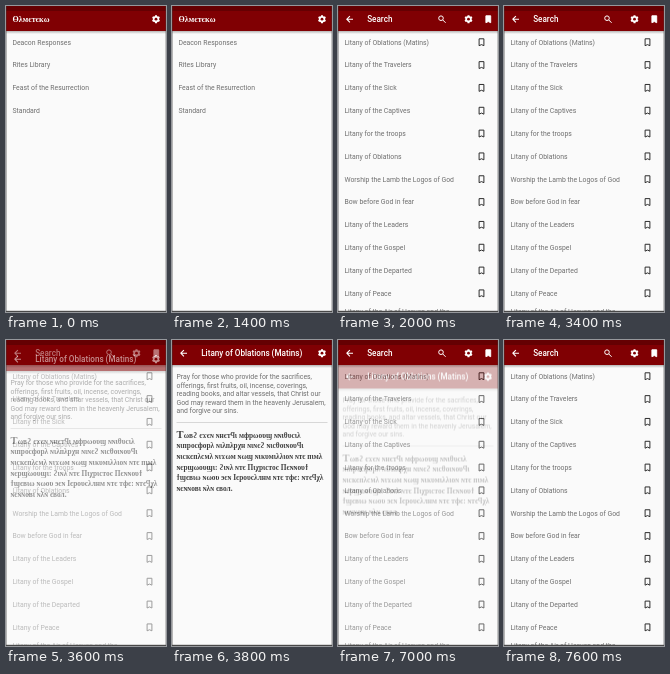
These frames come from a looping animation (160x306 px, 8000 ms). An HTML page with a canvas:

```html
<!DOCTYPE html>
<html lang="en">
<head>
<meta charset="utf-8">
<style>
html, body { margin: 0; width: 100%; height: 100%; overflow: hidden; background: #fafafa; }
canvas { display: block; width: 160px; height: 306px; }
</style>
</head>
<body>
<canvas id="stage"></canvas>
<script>
const W = 160, H = 306, LOOP = 8000;
const BAR = 25, ROW = 22.83;
const SANS = 'Roboto, sans-serif';
const UNCIAL = '"Liberation Serif", "DejaVu Sans", serif';
const GREY = '#6f6f6f', INK = '#404040', RED = '#800003';

const homeRows = ['Deacon Responses', 'Rites Library', 'Feast of the Resurrection', 'Standard'];
const litanies = [
  'Litany of Oblations (Matins)', 'Litany of the Travelers', 'Litany of the Sick',
  'Litany of the Captives', 'Litany for the troops', 'Litany of Oblations',
  'Worship the Lamb the Logos of God', 'Bow before God in fear',
  'Litany of the Leaders', 'Litany of the Gospel', 'Litany of the Departed', 'Litany of Peace'
];
const prayer = [
  'Pray for those who provide for the sacrifices,',
  'offerings, first fruits, oil, incense, coverings,',
  'reading books, and altar vessels, that Christ our',
  'God may reward them in the heavenly Jerusalem,',
  'and forgive our sins.'
];
const coptic = [
  'ωвϩ єϫєɴ ɴнєтϥι мфрωоυϣ ɴɴιθυсιλ',
  'ɴιпросфорλ ɴιλпλрχн ɴιɴєϩ ɴιсθоιɴоυϥι',
  'ɴιскєпλсмλ ɴιϫωм ɴωϣ ɴικυмιλλιоɴ ɴтє пιмλ',
  'ɴєрϣωоυϣι: ϩιɴλ ɴтє Пιχрιстос Пєɴɴоυϯ',
  'ϯϣєвιω ɴωоυ ϧєɴ Ιєроυсλлнм ɴтє тфє: ɴтєϥχλ',
  'ɴєɴɴовι ɴλɴ євол.'
];

const scale = Math.max(1, window.devicePixelRatio || 1);
const stage = document.getElementById('stage');
const layer = document.createElement('canvas');
for (const c of [stage, layer]) {
  c.width = Math.round(W * scale);
  c.height = Math.round(H * scale);
  c.getContext('2d').scale(scale, scale);
}
const out = stage.getContext('2d');

function text(c, str, x, y, font, color) {
  c.font = font;
  c.fillStyle = color;
  c.fillText(str, x, y);
}

function backArrow(c) {
  c.strokeStyle = '#fff';
  c.lineWidth = 1.1;
  c.beginPath();
  c.moveTo(15, 13.2); c.lineTo(9, 13.2);
  c.moveTo(11.9, 10.1); c.lineTo(8.8, 13.2); c.lineTo(11.9, 16.3);
  c.stroke();
}

function gear(c, x, y) {
  c.fillStyle = c.strokeStyle = '#fff';
  c.lineWidth = 2;
  c.beginPath();
  for (let i = 0; i < 3; i++) {
    const a = i * Math.PI / 3 + Math.PI / 6;
    const dx = 4 * Math.cos(a), dy = 4 * Math.sin(a);
    c.moveTo(x - dx, y - dy);
    c.lineTo(x + dx, y + dy);
  }
  c.stroke();
  c.beginPath();
  c.arc(x, y, 3.1, 0, 7);
  c.fill();
  c.fillStyle = RED;
  c.beginPath();
  c.arc(x, y, 1.4, 0, 7);
  c.fill();
}

function magnifier(c, x, y) {
  c.strokeStyle = '#fff';
  c.lineWidth = 1;
  c.beginPath();
  c.arc(x - 1, y - 1, 2.3, 0, 7);
  c.moveTo(x + 0.8, y + 0.8);
  c.lineTo(x + 3.6, y + 3.6);
  c.stroke();
}

function bookmark(c, x, y, filled) {
  c.beginPath();
  c.moveTo(x - 2.4, y - 3.4);
  c.lineTo(x + 2.4, y - 3.4);
  c.lineTo(x + 2.4, y + 3.5);
  c.lineTo(x, y + 2.4);
  c.lineTo(x - 2.4, y + 3.5);
  c.closePath();
  c.lineWidth = 0.95;
  c.lineJoin = 'round';
  c.strokeStyle = filled ? '#fff' : '#222';
  c.stroke();
  if (filled) {
    c.fillStyle = '#fff';
    c.fill();
  }
}

function base(c) {
  c.fillStyle = '#fafafa';
  c.fillRect(0, 0, W, H);
  const shadow = c.createLinearGradient(0, BAR, 0, BAR + 3);
  shadow.addColorStop(0, 'rgba(0,0,0,.28)');
  shadow.addColorStop(1, 'rgba(0,0,0,0)');
  c.fillStyle = shadow;
  c.fillRect(0, BAR, W, 3);
  c.fillStyle = RED;
  c.fillRect(0, 0, W, BAR);
}

function title(c, str) {
  backArrow(c);
  text(c, str, 29.2, 16, '500 8.15px ' + SANS, '#fff');
}

function rows(c, labels) {
  labels.forEach((label, i) => text(c, label, 6.4, 38.6 + i * ROW, '6.86px ' + SANS, GREY));
}

function home(c) {
  base(c);
  text(c, 'Өλмєтєкω', 6.6, 15.8, 'bold 8px ' + UNCIAL, '#fff');
  gear(c, 150, 13.2);
  rows(c, homeRows);
}

function list(c) {
  base(c);
  title(c, 'Search');
  magnifier(c, 104, 13.2);
  gear(c, 130.5, 13.2);
  bookmark(c, 150.3, 13.2, true);
  rows(c, litanies);
  litanies.forEach((_, i) => bookmark(c, 143.5, 36.2 + i * ROW, false));
  text(c, 'Litany of the Air of Heaven and the', 6.4, 307.6, '6.86px ' + SANS, GREY);
}

function detail(c) {
  base(c);
  title(c, 'Litany of Oblations (Matins)');
  gear(c, 150, 13.2);
  prayer.forEach((line, i) => text(c, line, 4.5, 39.4 + i * 8.4, '6.86px ' + SANS, GREY));
  c.fillStyle = '#cfcfcf';
  c.fillRect(4.5, 82, 151, 0.8);
  // The prayer opens with a tall initial.
  text(c, 'Т', 4.5, 98.4, 'bold 10.5px ' + UNCIAL, INK);
  coptic.forEach((line, i) =>
    text(c, line, i ? 4.5 : 11.7, 97.8 + i * 10.6, 'bold 7.35px ' + UNCIAL, INK));
}

// Hard steps; during a transition the upper page is shifted down and translucent.
const steps = [
  { until: 1600, under: home },
  { until: 2000, under: home, over: list, shift: 6, alpha: 0.55 },
  { until: 3600, under: list },
  { until: 3800, under: list, over: detail, shift: 6, alpha: 0.55 },
  { until: 7000, under: detail },
  { until: 7200, under: list, over: detail, shift: 23.5, alpha: 0.29 },
  { until: LOOP, under: list }
];

function deviceEdge(c) {
  c.fillStyle = 'rgba(50,0,0,.35)';
  c.fillRect(0, 0, W, 5);
  c.fillStyle = 'rgba(60,60,60,.45)';
  c.fillRect(0, 0, 0.8, H);
  c.fillRect(W - 0.6, 0, 0.6, H);
  c.fillStyle = '#484848';
  c.fillRect(0, H - 1.2, W, 1.2);
}

function draw(now) {
  const t = now % LOOP;
  const step = steps.find(s => t < s.until);
  step.under(out);
  if (step.over) {
    step.over(layer.getContext('2d'));
    out.globalAlpha = step.alpha;
    out.drawImage(layer, 0, step.shift, W, H);
    out.globalAlpha = 1;
  }
  deviceEdge(out);
}

const start = performance.now();
function tick() {
  draw(performance.now() - start);
  requestAnimationFrame(tick);
}
tick();
</script>
</body>
</html>
```
